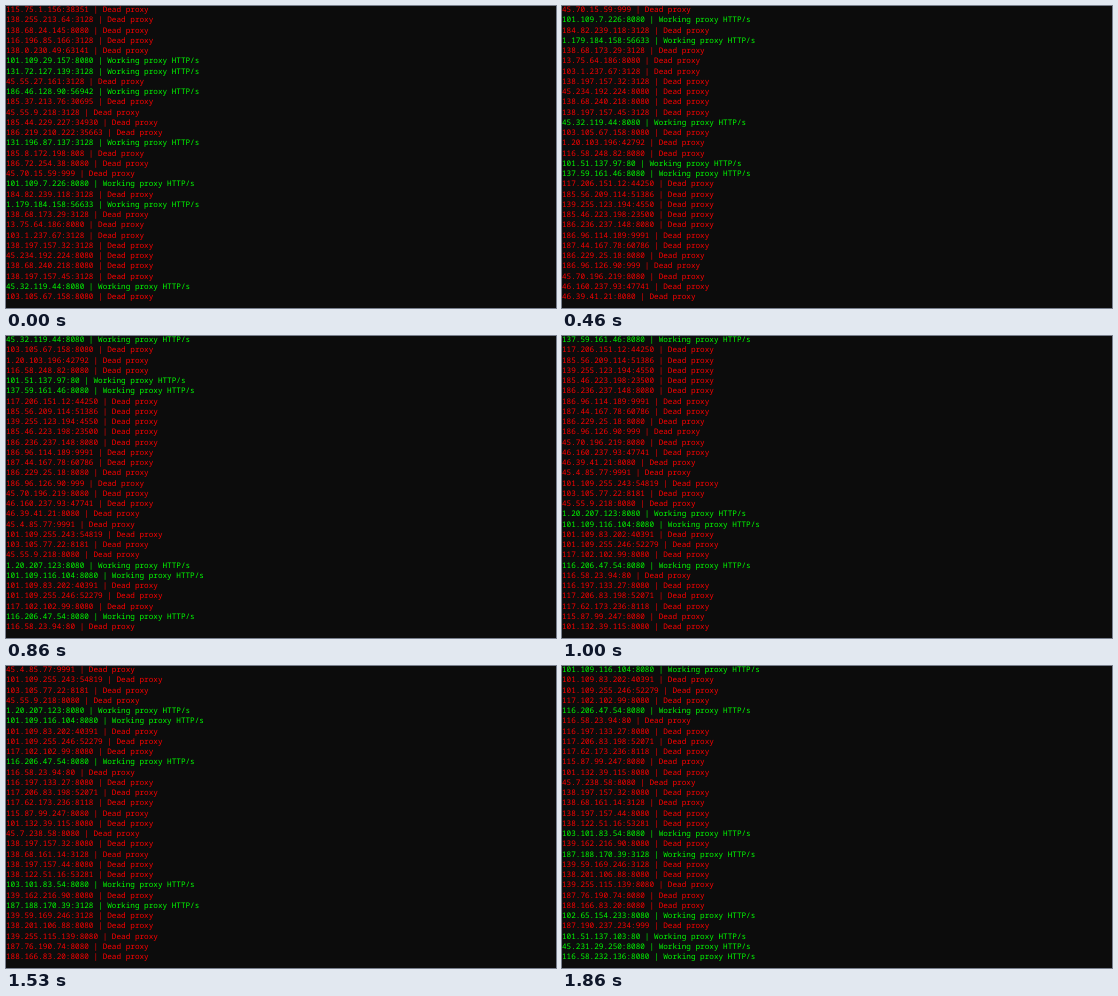
An HTML page for the animation above (2.06 s loop, 550 px wide and 302 px high).

```html
<!DOCTYPE html>
<html lang="en">
<head>
<meta charset="utf-8">
<title>Proxy checker</title>
<style>
  html, body { margin: 0; width: 100%; height: 100%; overflow: hidden; background: #0c0c0c; }
  svg { display: block; width: 550px; height: 302px; }
  text {
    font: 7.68px "Noto Sans Mono", "DejaVu Sans Mono", monospace;
    text-rendering: geometricPrecision;
    white-space: pre;
    fill: #f00;
  }
  text.ok { fill: #0f0; }
</style>
</head>
<body>
<svg id="screen" viewBox="0 0 550 302"></svg>
<script>
// A trailing "+" marks a working proxy.
const log = `
115.75.1.156:38351 138.255.213.64:3128 138.68.24.145:8080 116.196.85.166:3128
138.0.230.49:63141 101.109.29.157:8080+ 131.72.127.139:3128+ 45.55.27.161:3128
186.46.128.90:56942+ 185.37.213.76:30695 45.55.9.218:3128 185.44.229.227:34930
186.219.210.222:35663 131.196.87.137:3128+ 185.8.172.198:808 186.72.254.38:8080
45.70.15.59:999 101.109.7.226:8080+ 184.82.239.118:3128 1.179.184.158:56633+
138.68.173.29:3128 13.75.64.186:8080 103.1.237.67:3128 138.197.157.32:3128
45.234.192.224:8080 138.68.240.218:8080 138.197.157.45:3128 45.32.119.44:8080+
103.105.67.158:8080 1.20.103.196:42792 116.58.248.82:8080 101.51.137.97:80+
137.59.161.46:8080+ 117.206.151.12:44250 185.56.209.114:51386 139.255.123.194:4550
185.46.223.198:23500 186.236.237.148:8080 186.96.114.189:9991 187.44.167.78:60786
186.229.25.18:8080 186.96.126.90:999 45.70.196.219:8080 46.160.237.93:47741
46.39.41.21:8080 45.4.85.77:9991 101.109.255.243:54819 103.105.77.22:8181
45.55.9.218:8080 1.20.207.123:8080+ 101.109.116.104:8080+ 101.109.83.202:40391
101.109.255.246:52279 117.102.102.99:8080 116.206.47.54:8080+ 116.58.23.94:80
116.197.133.27:8080 117.206.83.198:52071 117.62.173.236:8118 115.87.99.247:8080
101.132.39.115:8080 45.7.238.58:8080 138.197.157.32:8080 138.68.161.14:3128
138.197.157.44:8080 138.122.51.16:53281 103.101.83.54:8080+ 139.162.216.90:8080
187.188.170.39:3128+ 139.59.169.246:3128 138.201.106.88:8080 139.255.115.139:8080
187.76.190.74:8080 188.166.83.20:8080 102.65.154.233:8080+ 187.190.237.234:999
101.51.137.103:80+ 45.231.29.250:8080+ 116.58.232.136:8080+
`.trim().split(/\s+/).map(entry => {
  const ok = entry.endsWith("+");
  const address = ok ? entry.slice(0, -1) : entry;
  return { ok, text: `${address} | ${ok ? "Working proxy HTTP/s" : "Dead proxy"}` };
});

// [time in ms, first visible log line]
const scroll = [
  [0, 0], [130, 3], [200, 5], [260, 8], [330, 11], [400, 13], [460, 16],
  [530, 18], [600, 21], [660, 23], [730, 25], [800, 27], [930, 30],
  [1000, 32], [1130, 35], [1200, 37], [1260, 39], [1400, 41], [1460, 43],
  [1530, 45], [1600, 47], [1660, 48], [1860, 50]
];
const LOOP = 2060, ROWS = 29, PITCH = 10.25, BASELINE = 6;

const screen = document.getElementById("screen");
const rows = Array.from({ length: ROWS }, (_, i) => {
  const row = document.createElementNS("http://www.w3.org/2000/svg", "text");
  row.setAttribute("x", 0);
  row.setAttribute("y", BASELINE + i * PITCH);
  return screen.appendChild(row);
});

let shown = -1;
function render(ms) {
  const t = ms % LOOP;
  const first = scroll.findLast(([start]) => start <= t)[1];
  if (first === shown) return;
  shown = first;
  rows.forEach((row, i) => {
    const line = log[first + i];
    row.textContent = line.text;
    row.setAttribute("class", line.ok ? "ok" : "");
  });
}

const begin = performance.now();
function tick() {
  render(performance.now() - begin);
  requestAnimationFrame(tick);
}
tick();
</script>
</body>
</html>
```
